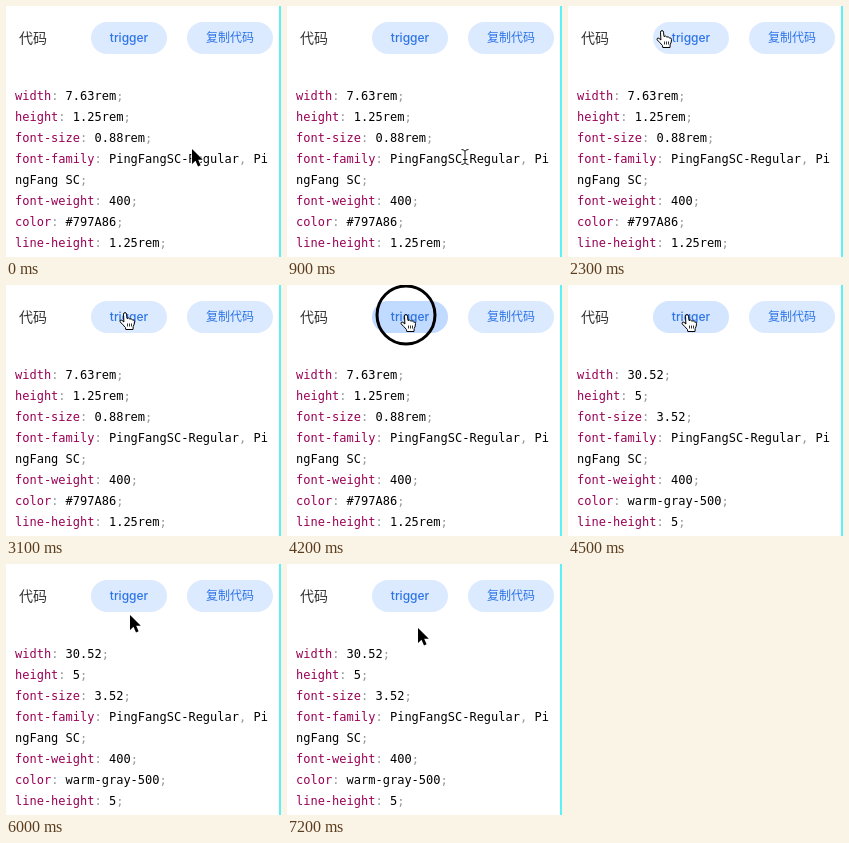
Write an HTML page that moves like this. It is 275 px wide and 251 px high and loops after 8 s.

```html
<!DOCTYPE html>
<html lang="zh">
<head>
<meta charset="utf-8">
<style>
html, body { margin: 0; width: 100%; height: 100%; overflow: hidden; background: #fff; }
svg { display: block; }
.ui { font: 500 12px Inter, "Noto Sans CJK SC", "Noto Sans CJK", sans-serif; fill: #2d74e7; text-anchor: middle; }
.ui .title { font-size: 14px; fill: #333; text-anchor: start; }
.code { font: 12px "DejaVu Sans Mono", monospace; fill: #000; }
.pill { fill: #dceaff; }
</style>
</head>
<body>
<svg width="275" height="251" viewBox="0 0 275 251">
  <g class="ui">
    <text class="title" x="13" y="37">代码</text>
    <rect id="trigger" class="pill" x="85" y="16" width="76" height="32" rx="16"/>
    <text x="123" y="36">trigger</text>
    <rect class="pill" x="181" y="16" width="86" height="32" rx="16"/>
    <text x="224" y="36">复制代码</text>
  </g>
  <g class="code" id="code"></g>
  <path d="M274 0V251" stroke="#5df1f7" stroke-width="2"/>
  <circle id="ring" cx="119" cy="30" r="29" fill="none" stroke="#000" stroke-width="3"/>

  <g id="arrow">
    <path d="M0 0V15L3.5 11.8 6 17.4 8.6 16.3 6.2 10.8H10.8Z" stroke="#fff" stroke-width="1.6" stroke-linejoin="round" paint-order="stroke"/>
  </g>
  <g id="beam" fill="none">
    <path id="stem" d="M-3.5 -7.5Q-.5 -7.5 0 -5.5Q.5 -7.5 3.5 -7.5M0 -5.5V5.5M-3.5 7.5Q-.5 7.5 0 5.5Q.5 7.5 3.5 7.5M-2 2.5H2" stroke="#fff" stroke-width="2"/>
    <use href="#stem" style="stroke:#000"/>
    <path d="M-3.5 -7.5Q-.5 -7.5 0 -5.5Q.5 -7.5 3.5 -7.5M0 -5.5V5.5M-3.5 7.5Q-.5 7.5 0 5.5Q.5 7.5 3.5 7.5M-2 2.5H2" stroke="#111"/>
  </g>
  <g id="hand" fill="#fff" stroke="#000" stroke-linejoin="round">
    <path d="M4.9 10L4.5 2.2Q4.5 .6 6 .6Q7.4 .6 7.5 2.2L8 6.5Q9.6 5.3 10.8 7Q12.4 6.3 13.3 7.8Q15.4 7.4 15.5 9.6Q15.6 12 14.2 14.6L14 17.5H6.8L6.4 15.4Q4 12.8 1.1 9.8Q.7 7.6 2.8 8.2Z"/>
    <path d="M8.5 11.5V14.5M10.5 11.5V14.5M12.5 11.5V14.5" stroke-width=".8"/>
  </g>
</svg>
<script>
const $ = id => document.getElementById(id);
const LOOP = 8000, STEP = 100, CLICK = 4200, RELEASE = 4400;

const lines = (width, height, size, color) => [
  `width: ${width};`,
  `height: ${height};`,
  `font-size: ${size};`,
  'font-family: PingFangSC-Regular, Pi',
  'ngFang SC;',
  'font-weight: 400;',
  `color: ${color};`,
  `line-height: ${height};`
];

const paint = text => text
  .replace(/[:;,]/g, '<tspan fill="#999">$&</tspan>')
  .replace(/^[\w-]+(?=<)/, '<tspan fill="#905">$&</tspan>');

const markup = list => list.map((text, i) =>
  `<text x="9" y="${94 + 21 * i}">${paint(text)}</text>`).join('');

const before = markup(lines('7.63rem', '1.25rem', '0.88rem', '#797A86'));
const after = markup(lines('30.52', '5', '3.52', 'warm-gray-500'));

// Pointer path: shape, then [time, x, y] stops
const path = [
  ['arrow', [0, 186, 143]],
  ['beam', [900, 178, 151], [1000, 175, 150], [1100, 173, 150], [1400, 172.5, 150],
    [1700, 171.5, 149.5], [1800, 164, 134], [1900, 148, 105]],
  ['arrow', [2000, 127, 75], [2100, 107, 51]],
  ['hand', [2200, 90, 33], [2300, 88, 24], [2400, 101, 23], [2500, 113, 28],
    [2600, 113, 27], [2800, 113, 26], [3100, 113, 27], [3300, 113, 28], [3700, 113, 29],
    [5100, 113, 30], [5200, 113, 32], [5300, 113, 33],
    [5600, 110, 31], [5700, 105, 29], [5800, 104, 33]],
  ['arrow', [5900, 119, 46], [6000, 124, 51], [6200, 126, 57], [6400, 128, 61],
    [6500, 130, 63], [6700, 131, 64]]
].flatMap(([shape, ...stops]) => stops.map(([t, x, y]) => ({ shape, t, x, y })));

let shown;
function draw(t) {
  const now = path.findLast(p => p.t <= t);
  for (const id of ['arrow', 'beam', 'hand'])
    $(id).style.display = id === now.shape ? '' : 'none';
  $(now.shape).setAttribute('transform', `translate(${now.x} ${now.y})`);

  const pressed = t >= CLICK && t < RELEASE;
  const fade = Math.max(0, 1 - (t - RELEASE + STEP) / (3 * STEP));
  const press = pressed ? 1 : t >= RELEASE ? fade : 0;
  const mix = (a, b) => Math.round(a + (b - a) * press);
  $('trigger').style.fill = `rgb(${mix(220, 193)},${mix(234, 218)},255)`;
  $('ring').style.display = pressed ? '' : 'none';

  const code = t < RELEASE ? before : after;
  if (code !== shown) $('code').innerHTML = shown = code;
}

const start = performance.now();
function tick() {
  const t = (performance.now() - start) % LOOP;
  draw(Math.floor(t / STEP) * STEP);
  requestAnimationFrame(tick);
}
tick();
</script>
</body>
</html>
```
